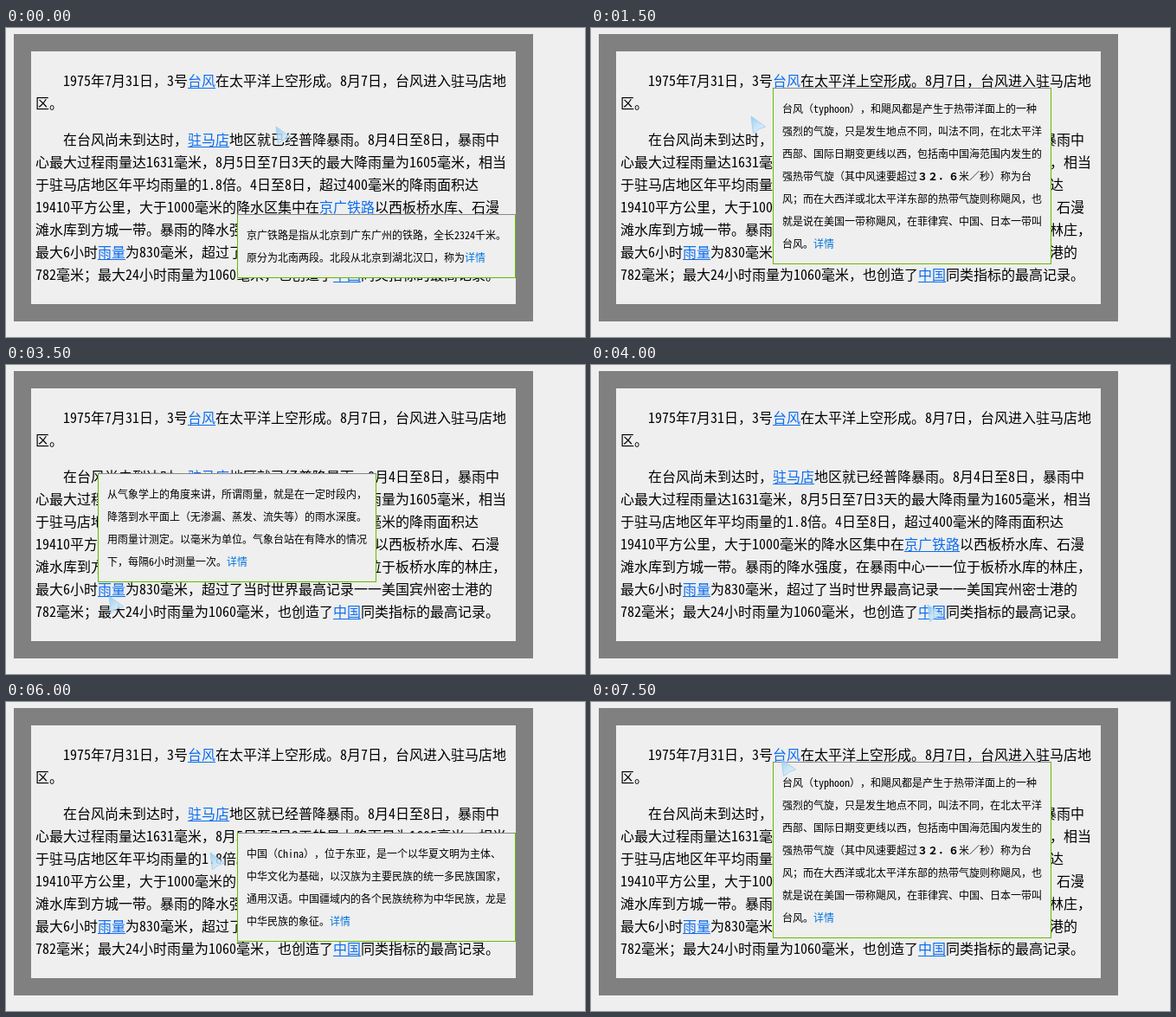
Recreate the animation shown at these times as an HTML page. Size 669 by 357 pixels, loop 8000 ms.

```html
<!DOCTYPE html>
<html lang="zh-CN">
<head>
<meta charset="utf-8">
<style>
html, body { margin: 0; width: 100%; height: 100%; overflow: hidden; background: #efefef; }
body {
  position: relative; color: #000;
  font: 300 16px/26px "Noto Sans Mono CJK SC", "Liberation Serif", "Noto Sans CJK SC", "Noto Sans CJK", serif;
  text-spacing-trim: space-all; text-autospace: no-autospace; font-kerning: none;
}
#page { position: absolute; left: 9px; top: 7px; width: 560px; height: 292px; border: 20px solid #808080; }
p { position: absolute; left: 5px; margin: 0; white-space: pre; }
u { color: #0a6cf0; text-decoration-thickness: 1px; text-underline-offset: 2px; }
.tip {
  position: absolute; width: 300px; padding: 10px; font-size: 12px; white-space: pre;
  background: #efefef; border: 1px solid #6b0; border-top-color: #888; visibility: hidden;
}
.tip span { color: #0074e0; }
.tip b { font-weight: 700; }
#cursor { position: absolute; left: 0; top: 0; }
</style>
</head>
<body>
<div id="page">
<p style="top:20px">　　1975年7月31日，3号<u>台风</u>在太平洋上空形成。8月7日，台风进入驻马店地
区。</p>
<p style="top:88px">　　在台风尚未到达时，<u>驻马店</u>地区就已经普降暴雨。8月4日至8日，暴雨中
心最大过程雨量达1631毫米，8月5日至7日3天的最大降雨量为1605毫米，相当
于驻马店地区年平均雨量的1.8倍。4日至8日，超过400毫米的降雨面积达
19410平方公里，大于1000毫米的降水区集中在<u>京广铁路</u>以西板桥水库、石漫
滩水库到方城一带。暴雨的降水强度，在暴雨中心一一位于板桥水库的林庄，
最大6小时<u>雨量</u>为830毫米，超过了当时世界最高记录一一美国宾州密士港的
782毫米；最大24小时雨量为1060毫米，也创造了<u>中国</u>同类指标的最高记录。</p>
</div>

<div class="tip" id="railway" style="left:267px;top:215px">京广铁路是指从北京到广东广州的铁路，全长2324千米。
原分为北南两段。北段从北京到湖北汉口，称为<span>详情</span></div>

<div class="tip" id="typhoon" style="left:210px;top:69px">台风（typhoon），和飓风都是产生于热带洋面上的一种
强烈的气旋，只是发生地点不同，叫法不同，在北太平洋
西部、国际日期变更线以西，包括南中国海范围内发生的
强热带气旋（其中风速要超过<b>３２．６</b>米／秒）称为台
风；而在大西洋或北太平洋东部的热带气旋则称飓风，也
就是说在美国一带称飓风，在菲律宾、中国、日本一带叫
台风。<span>详情</span></div>

<div class="tip" id="rain" style="left:106px;top:125px">从气象学上的角度来讲，所谓雨量，就是在一定时段内，
降落到水平面上（无渗漏、蒸发、流失等）的雨水深度。
用雨量计测定。以毫米为单位。气象台站在有降水的情况
下，每隔6小时测量一次。<span>详情</span></div>

<div class="tip" id="china" style="left:267px;top:151px">中国（China），位于东亚，是一个以华夏文明为主体、
中华文化为基础，以汉族为主要民族的统一多民族国家，
通用汉语。中国疆域内的各个民族统称为中华民族，龙是
中华民族的象征。<span>详情</span></div>

<svg id="cursor" width="20" height="22">
  <defs><linearGradient id="ice" x2=".6" y2="1">
    <stop stop-color="#8cc6f2"/><stop offset=".5" stop-color="#b8dff7"/><stop offset="1" stop-color="#e6f4fd"/>
  </linearGradient></defs>
  <path d="M1 1L17.5 13L10.5 15.5L3.5 20.5Z" fill="url(#ice)" stroke="#98cbee" stroke-linejoin="round" opacity=".85"/>
</svg>

<script>
const STEP = 500, LOOP = 8000;
// Cursor x, y and the open tip for each step
const steps = [
  [311, 113, 'railway'], [222, 68], [219, 66, 'typhoon'],
  [184, 101, 'typhoon'], [184, 101, 'typhoon'], [143, 223],
  [115, 272], [118, 266, 'rain'], [388, 276],
  [384, 290, 'china'], [385, 290, 'china'], [385, 287, 'china'], [235, 173, 'china'],
  [225, 120], [224, 62, 'typhoon'], [219, 65, 'typhoon'],
];
const cursor = document.getElementById('cursor');
const tips = document.querySelectorAll('.tip');

function draw() {
  const [x, y, open] = steps[Math.floor(performance.now() % LOOP / STEP)];
  cursor.style.transform = `translate(${x}px, ${y}px)`;
  for (const tip of tips) tip.style.visibility = tip.id === open ? 'visible' : 'hidden';
  requestAnimationFrame(draw);
}
draw();
</script>
</body>
</html>
```
